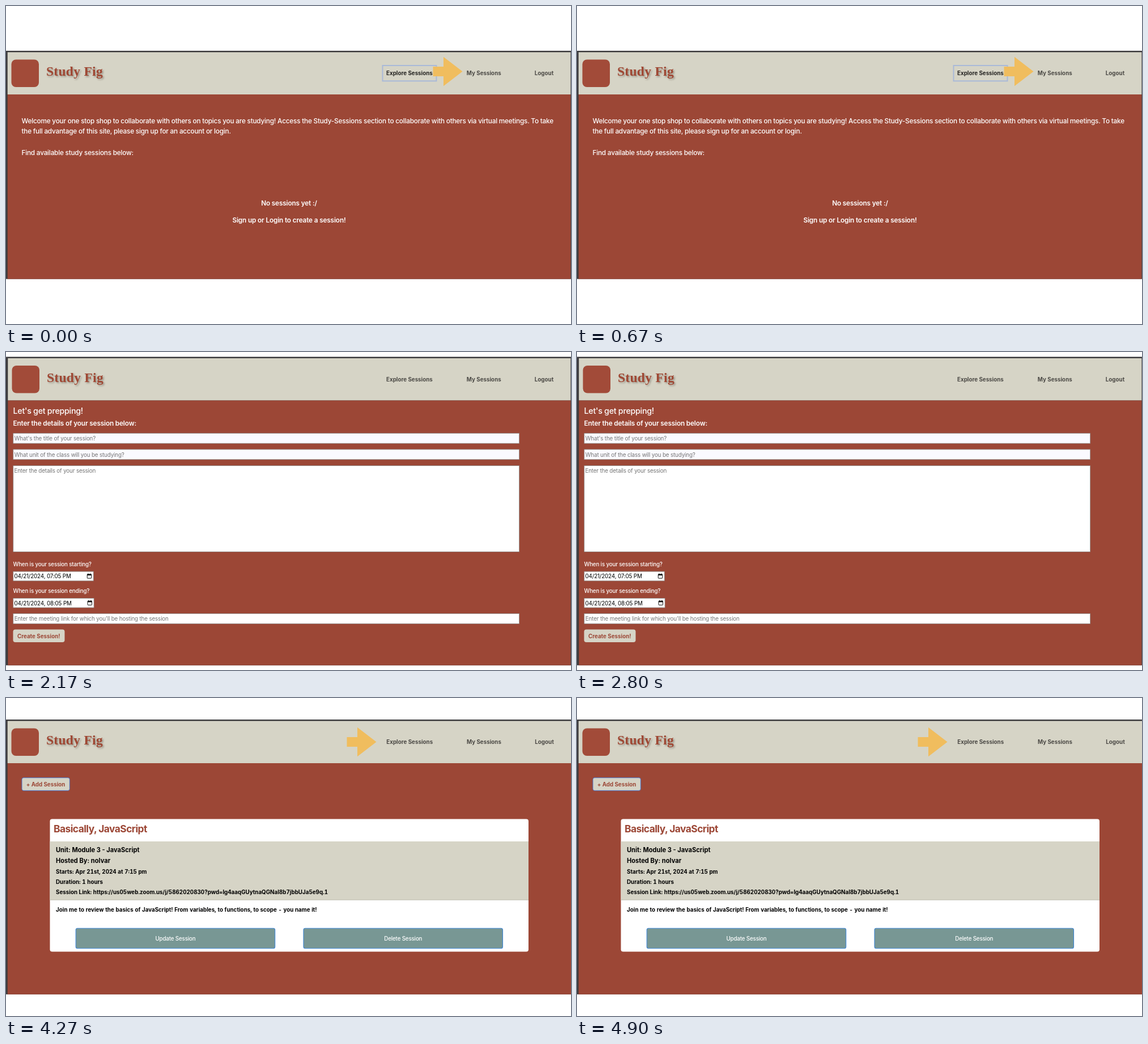
An HTML page that plays this animation: 997x561 px, repeating every 5.32 s.

```html
<!DOCTYPE html>
<html lang="en">
<head>
<meta charset="utf-8">
<title>Study session walkthrough</title>
<style>
  html, body { margin: 0; width: 100%; height: 100%; overflow: hidden; background: #fff; }
  svg { display: block; width: 997px; height: 561px; }
  text { font-family: Inter, Roboto, sans-serif; white-space: pre; }
  .brand { font: bold 23.5px "Liberation Serif", "Times New Roman", serif; letter-spacing: .3px;
    fill: #9f4733; filter: drop-shadow(2px 2px 1.5px rgba(70, 60, 50, .42)); }
  .button { font-size: 9.8px; font-weight: 700; }
  .body { font-size: 11.8px; font-weight: 500; letter-spacing: -.0186em; }
  .strong { font-size: 11.8px; font-weight: 600; letter-spacing: -.0135em; }
  .lead { font-size: 14.3px; font-weight: 500; letter-spacing: -.02em; }
  .field { font-size: 9.9px; letter-spacing: -.018em; }
  .label { font-size: 9.8px; font-weight: 500; letter-spacing: -.018em; }
  .heading { font-size: 17.4px; font-weight: 700; letter-spacing: -.032em; }
  .unit { font-size: 11.1px; font-weight: 700; }
  .fact { font-size: 9.8px; font-weight: 700; font-variant-numeric: tabular-nums; }
</style>
</head>
<body>
<svg id="stage" viewBox="0 0 997 561"></svg>
<script>
const RUST = '#9c4736', BEIGE = '#d6d4c6', DARK = '#3b3a3c', WHITE = '#fff';
const MEETING = 'https://us05web.zoom.us/j/5862020830?pwd=lg4aaqGUytnaQGNaI8b7jbbUJa5e9q.1';
const PITCH = 'Join me to review the basics of JavaScript! From variables, to functions, to scope - you name it!';

const rect = (x, y, right, bottom, fill, extra = '') =>
  `<rect x="${x}" y="${y}" width="${right - x}" height="${bottom - y}" fill="${fill}" ${extra}/>`;
const text = (x, y, style, content, fill = WHITE, anchor = 'start') =>
  `<text x="${x}" y="${y}" class="${style}" fill="${fill}" text-anchor="${anchor}">${content}</text>`;
const centered = (x, y, style, content) => text(x, y, style, content, WHITE, 'middle');

const arrow = (x, y, direction) =>
  `<path transform="translate(${x} ${y}) scale(${direction} 1)" fill="#f0bd5e"
    d="M0 0L-33.5 -25.8V-8.4H-52V8.4H-33.5V25.8Z"/>`;

// Window border, header bar, brand and navigation shared by every screen.
function page({ top, bar, bottom, left, right = 997, logo, nav, active = -1 }) {
  const [x, y] = logo;
  const links = ['Explore Sessions', 'My Sessions', 'Logout'];
  return rect(0, top, 997, bottom, DARK)
    + rect(left, top + 2.5, right, bar, BEIGE)
    + rect(left, bar, right, bottom, RUST)
    + rect(x, y, x + 48.5, y + 48.5, '#a24b39', 'rx="8"')
    + text(x + 61.5, y + 28.5, 'brand', 'Study Fig')
    + links.map((link, i) =>
        text(nav[i], y + 27.7, 'button', link, i === active ? '#252422' : '#4b4945')).join('');
}

const focusRing = (x, y, right, bottom) =>
  rect(x, y, right, bottom, 'none', 'stroke="#a9b9d8" stroke-width="2"');

const addButton = (x, y) =>
  rect(x, y, x + 84.3, y + 22.6, BEIGE, 'rx="3" stroke="#3f74d4" stroke-width=".9"')
  + text(x + 7.7, y + 14.9, 'button', '+ Add Session', RUST);

const box = (x, y, right, bottom, fill = WHITE) =>
  rect(x, y, right, bottom, fill, 'stroke="#8b8583" stroke-width=".8"');

function dateField(x, y, width, value) {
  const icon = x + width - 11;
  return box(x, y, x + width, y + 16.6)
    + text(x + 1.7, y + 12.1, 'field', value, '#000')
    + rect(icon, y + 5, icon + 7.4, y + 12, 'none', 'stroke="#111" rx=".6"')
    + rect(icon, y + 4.5, icon + 7.4, y + 7, '#111')
    + rect(icon + 1, y + 3.6, icon + 2.2, y + 5, '#111')
    + rect(icon + 5.2, y + 3.6, icon + 6.4, y + 5, '#111');
}

function form(x, lift, ink, values, start, end) {
  const [title, unit, details, link] = values;
  const edge = 905.7, tint = '#fafaff';
  return text(x, 109 - lift, 'lead', "Let's get prepping!")
    + text(x, 129.8 - lift, 'strong', 'Enter the details of your session below:')
    + box(x + .3, 143.3 - lift, edge, 161.2 - lift, tint)
    + text(x + 2.3, 155.9 - lift, 'field', title, ink)
    + box(x + .3, 171.9 - lift, edge, 189.7 - lift, tint)
    + text(x + 2.3, 184.5 - lift, 'field', unit, ink)
    + box(x + .3, 200.6 - lift, edge, 352.4 - lift / 2)
    + text(x + 1.9, 213 - lift, 'field', details, ink)
    + text(x, 377.7, 'label', 'When is your session starting?')
    + dateField(x + .3, 387.2, 141.5, start)
    + text(x, 425, 'label', 'When is your session ending?')
    + dateField(x + .3, 434.4, 142.3, end)
    + box(x + .3, 461.5, edge, 479.3)
    + text(x + 2.3, 474.1, 'field', link, ink)
    + rect(x, 489.5, x + 91, 512, BEIGE, 'rx="4"')
    + text(x + 7.5, 504.5, 'button', 'Create Session!', RUST);
}

const action = (x, label) =>
  rect(x, 406.3, x + 351.5, 441.7, '#789794', 'rx="3" stroke="#3f86d6" stroke-width="1.1"')
  + centered(x + 175.8, 427.8, 'label', label);

const explore = page({ top: 79, bar: 156, bottom: 481.6, left: 2.7, right: 996.3,
    logo: [9.5, 94.5], nav: [671, 812.8, 932.8], active: 0 })
  + focusRing(664.5, 105, 759.5, 132.3)
  + text(27.5, 206.8, 'body', 'Welcome your one stop shop to collaborate with others on topics you are studying! Access the Study-Sessions section to collaborate with others via virtual meetings. To take')
  + text(27.5, 225.3, 'body', 'the full advantage of this site, please sign up for an account or login.')
  + text(27.5, 262.5, 'body', 'Find available study sessions below:')
  + centered(499.5, 351.8, 'strong', 'No sessions yet :/')
  + centered(499.5, 381.5, 'strong', 'Sign up or Login to create a session!')
  + arrow(805.5, 115.5, 1);

const emptyList = page({ top: 98.5, bar: 176.4, bottom: 461.3, left: 1,
    logo: [8, 114.5], nav: [671.8, 813.8, 934.3], active: 1 })
  + focusRing(807.8, 125.3, 881, 152.6)
  + addButton(26.2, 201.9)
  + centered(499.5, 286.6, 'strong', 'No sessions yet :/')
  + centered(499.5, 316.6, 'strong', 'Register for sessions in the explore page or create your own session!')
  + arrow(134.5, 213.5, -1);

const blankForm = page({ top: 8.5, bar: 85.5, bottom: 552.7, left: 3.3, right: 996.3,
    logo: [10.5, 24], nav: [671, 812.8, 932.8] })
  + form(12.5, 0, '#757575', ["What's the title of your session?",
    'What unit of the class will you be studying?', 'Enter the details of your session',
    "Enter the meeting link for which you'll be hosting the session"],
    '04/21/2024, 07:05 PM', '04/21/2024, 08:05 PM');

const filledForm = page({ top: 7.3, bar: 84.6, bottom: 552.7, left: 1.5, right: 996.3,
    logo: [8.5, 23.2], nav: [670.5, 812.5, 932.6] })
  + form(10.7, .8, '#000', ['Basically, JavaScript', 'Module 3 - JavaScript', PITCH, MEETING],
    '04/21/2024, 07:15 PM', '04/21/2024, 08:15 PM')
  + arrow(117, 498.7, -1);

const sessionCard = page({ top: 38, bar: 115, bottom: 522.8, left: 2.7,
    logo: [9.5, 53.5], nav: [671.3, 813, 933.3] })
  + addButton(28, 140.7)
  + rect(77.5, 213.5, 922, 447.5, WHITE, 'rx="4"')
  + rect(77.5, 253, 922, 356.5, BEIGE)
  + rect(77.5, 355.7, 922, 356.5, '#b9b8ad')
  + text(84, 237.2, 'heading', 'Basically, JavaScript', RUST)
  + text(88, 271.5, 'unit', 'Unit: Module 3 - JavaScript', '#000')
  + text(88, 290.9, 'unit', 'Hosted By: nolvar', '#000')
  + text(88, 309.5, 'fact', 'Starts: Apr 21st, 2024 at 7:15 pm', '#000')
  + text(88, 327.5, 'fact', 'Duration: 1 hours', '#000')
  + text(88, 345.6, 'fact', 'Session Link: ' + MEETING, '#000')
  + text(88, 377.3, 'fact', PITCH, '#000')
  + action(123.2, 'Update Session')
  + action(525, 'Delete Session')
  + arrow(653.5, 77.5, 1);

const LOOP = 5320;
const starts = [0, 1120, 2170, 3220, 4270];
const stage = document.getElementById('stage');
stage.innerHTML = [explore, emptyList, blankForm, filledForm, sessionCard]
  .map(markup => `<g>${markup}</g>`).join('');
const screens = [...stage.children];

function render(time) {
  const now = time % LOOP;
  const current = starts.filter(start => start <= now).length - 1;
  screens.forEach((screen, i) => { screen.style.display = i === current ? '' : 'none'; });
}

const origin = performance.now();
function tick() {
  render(performance.now() - origin);
  requestAnimationFrame(tick);
}
tick();
</script>
</body>
</html>
```
